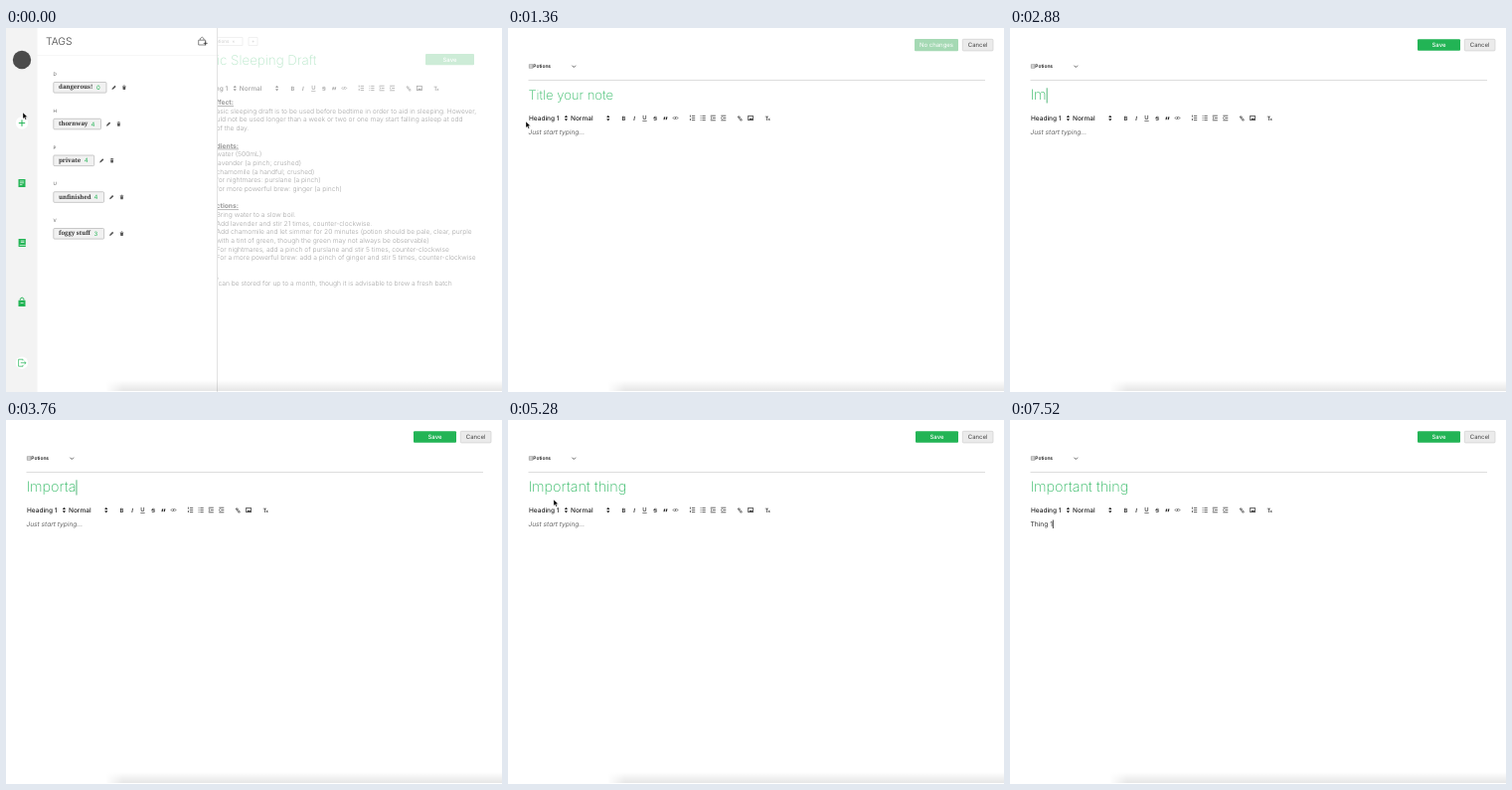
Write an HTML page that moves like this. It is 499 px wide and 366 px high and loops after 8 s.

```html
<!DOCTYPE html>
<html lang="en">
<head>
<meta charset="utf-8">
<title>Note editor</title>
<style>
html, body { margin: 0; width: 100%; height: 100%; overflow: hidden; background: #fff; }
svg { display: block; width: 499px; height: 366px; font-family: Inter, "Open Sans", sans-serif; fill: #222; }
text { white-space: pre; text-rendering: geometricPrecision; }
.mid { text-anchor: middle; }
.light { font-weight: 300; }
.title { font-weight: 200; fill: #2fb862; }
.line { fill: none; stroke: #222; stroke-width: .7; }
.green { fill: none; stroke: #22b455; stroke-width: 1; }
.tag { font: 600 6px "Noto Serif", serif; fill: #333; }
.copy { font-size: 6.71px; font-weight: 300; fill: #a6a6a6; }
.head { font-weight: 700; text-decoration: underline; fill: #999; }
.list { font-size: 5.7px; font-weight: 700; fill: #111; }
</style>
</head>
<body>
<svg viewBox="0 0 499 366">
  <defs>
    <linearGradient id="shade" x2="0" y2="1">
      <stop offset="0" stop-opacity="0"/><stop offset="1" stop-opacity=".1"/>
    </linearGradient>
    <linearGradient id="edge">
      <stop offset="0" stop-color="#fff"/><stop offset="1" stop-color="#fff" stop-opacity="0"/>
    </linearGradient>
    <g id="bar">
      <g font-size="6.5" font-weight="500">
        <text x="21" y="92.7">Heading 1</text><text x="63" y="92.7">Normal</text>
      </g>
      <path d="M56.8 90l1.6-2.2 1.6 2.2zm0 1.2h3.2l-1.6 2.2zM99.2 90l1.6-2.2 1.6 2.2zm0 1.2h3.2l-1.6 2.2z"/>
      <g class="mid" font-size="5.8" font-weight="600">
        <text x="116.5" y="92.5">B</text>
        <text x="127" y="92.5" font-style="italic">I</text>
        <text x="137.5" y="92.2" font-weight="500" text-decoration="underline">U</text>
        <text x="148" y="92.5" font-weight="500" text-decoration="line-through">S</text>
        <text x="158.3" y="96" font-size="9" font-weight="800">”</text>
        <text x="260.3" y="92.5" font-weight="500">T</text>
        <text x="262.7" y="93.3" font-size="4">x</text>
      </g>
      <path class="line" d="M167.4 89.2l-1.3 1.3 1.3 1.3m2.2-2.6l1.3 1.3-1.3 1.3m-1.5.1l.8-2.8"/>
      <path class="line" d="M184.9 88.4h3.3m-3.3 2.1h3.3m-3.3 2.1h3.3M183.4 87.6v2m0 1.4v2
        M195.4 88.4h3.3m-3.3 2.1h3.3m-3.3 2.1h3.3M193.6 88.4h.9m-.9 2.1h.9m-.9 2.1h.9
        M203.8 88.2h5m-3 2.3h3m-5 2.3h5m-5-3.4l1.3 1.1-1.3 1.1
        M214.3 88.2h5m-3 2.3h3m-5 2.3h5m-3.8-3.4l-1.2 1.1 1.2 1.1"/>
      <path class="line" d="M233.6 89.8l-.9-.9q-.9-.6-1.3.2t.6 1.3l.9.6m1.2-.1l1 .9q.5 1-.4 1.2t-1.3-.5l-.7-.9m-.6-1.9l2.2 2"/>
      <rect class="line" x="241.7" y="88.3" width="4.8" height="4.4"/>
      <path d="M242.4 92.3l1.3-1.8 1 .9.7-.6.8 1.5z"/>
    </g>
  </defs>

  <g id="editor">
    <g id="idle">
      <rect x="409" y="11" width="44" height="12.3" rx="1" fill="#a5d9b4"/>
      <text class="mid" x="431" y="19.2" font-size="6" fill="#fff">No changes</text>
    </g>
    <g id="save">
      <rect x="410" y="11.3" width="43" height="11.5" rx="1" fill="#22b455"/>
      <text class="mid" x="431.5" y="19.2" font-size="6" font-weight="500" fill="#fff">Save</text>
    </g>
    <rect x="457.3" y="11.3" width="30.7" height="11.6" rx="1" fill="#ebebeb" stroke="#cfcfcf" stroke-width=".7"/>
    <text class="mid" x="472.6" y="19.2" font-size="6" fill="#444">Cancel</text>
    <path class="line" d="M21.3 36.6h3.6v3.8h-3.6zm0 1.3h3.6m-3.6 1.2h3.6" style="stroke:#777;stroke-width:.5"/>
    <text x="25.3" y="40.3" font-size="4.9" font-weight="600">Potions</text>
    <path class="line" d="M64.4 37.7l1.8 1.8 1.8-1.8"/>
    <path d="M20.5 52.5h459.5" stroke="#ddd"/>
    <text id="hint" class="title" x="20.4" y="72.4" font-size="13.1">Title your note</text>
    <text id="title" class="title" x="20.4" y="72.4" font-size="14.4"></text>
    <use href="#bar"/>
    <text id="bodyHint" x="20.4" y="107.3" font-size="6.6" font-style="italic" fill="#666">Just start typing...</text>
    <text id="body" x="20.4" y="107.3" font-size="6.7" fill="#333"></text>
    <g id="list">
      <rect x="-2" y="75.5" width="503" height="63" fill="#fff" stroke="#a3cdef"/>
    </g>
    <rect id="caret" width=".9"/>
  </g>

  <g id="tags">
    <rect width="499" height="366" fill="#fff"/>
    <g id="note">
      <path d="M205 9.5h33v8h-33zM244 9.5h9v8h-9z" fill="none" stroke="#eee" stroke-width=".8"/>
      <text x="211" y="15.3" font-size="4.7" fill="#ccc">otions  ×</text>
      <text x="247" y="15.3" font-size="5" fill="#ccc">+</text>
      <text class="title" x="212" y="36.7" font-size="13.4" opacity=".35">ic Sleeping Draft</text>
      <rect x="422" y="26" width="49" height="11.3" rx="1" fill="#cdecd7"/>
      <text class="mid" x="446.5" y="33.8" font-size="6" font-weight="500" fill="#fff">Save</text>
      <use href="#bar" x="171.8" y="-30" opacity=".42"/>
    </g>
    <rect x="31" width="181" height="366" fill="#fff"/>
    <path d="M31 27.5h181" stroke="#f7f7f7"/>
    <path d="M212.5 0v366" stroke="#e2e2e2"/>
    <rect width="31.5" height="366" fill="#f3f3f3"/>
    <text class="light" x="40" y="17" font-size="10.3" fill="#444">TAGS</text>
    <path class="line" d="M193.7 12.2h7v4.8h-7zm1.6-.2v-1.3q2-3 3.8 0v1.3" style="stroke:#555"/>
    <path class="line" d="M200.7 13.4v4m-2-2h4" style="stroke:#333"/>
    <circle cx="16" cy="32" r="9.2" fill="#4b4b4b"/>
    <g fill="#fff"><circle cx="16" cy="95.5" r="6.2"/><circle cx="16" cy="336.7" r="6.2"/></g>
    <path class="green" d="M16 92.4v6.4m-3.2-3.2h6.4"/>
    <path d="M12.5 152h7v8h-7zM12.6 212h7.2v8h-7.2zM12.5 273.7h7v6.3h-7z" fill="#22b455"/>
    <path class="green" d="M14.3 273.5v-1.3q1.8-2.4 3.6 0v1.3"/>
    <path d="M13.9 154h4.2m-4.2 1.8h4.2m-4.2 1.8h2.5M14.8 214h3.6m-3.6 1.5h3.6M13.6 218.4h6.2M14.6 276.5h3" stroke="#fff" stroke-width=".7"/>
    <path class="green" d="M17 334.4v-1.2h-4.4v7h4.4v-1.2M14.8 336.7h5.2m-1.6-1.6l1.6 1.6-1.6 1.6" style="stroke-width:.7"/>
  </g>

  <rect x="101" y="354" width="398" height="11" fill="url(#shade)"/>
  <rect x="100" y="353" width="18" height="13" fill="url(#edge)"/>

  <path id="arrow" d="M0 0v6.3l1.5-1.3 1 2.3 1.1-.5-1-2.2h2z" fill="#000" stroke="#fff" stroke-width=".4"/>
  <path id="beam" d="M-1.6-4.3q1.6 0 1.6 1 0-1 1.6-1M0-3.4v6.8M-1.6 4.3q1.6 0 1.6-1 0 1 1.6 1" class="line"/>
</svg>
<script>
const $ = id => document.getElementById(id);
const add = (id, markup) => $(id).insertAdjacentHTML('beforeend', markup);

["SUPER", "d", "k", "a", "kjanksdfs", "afskjdnfasd"].forEach((s, i) =>
  add('list', `<text class="list" x="3.4" y="${83.5 + i * 10.4}">${s}</text>`));

// letter, label, count, right edge of the pill
[["D", "dangerous!", 0, 101], ["H", "thornway", 4, 95.5], ["P", "private", 4, 88.7],
 ["U", "unfinished", 4, 98.6], ["V", "foggy stuff", 3, 98.6]].forEach(([letter, label, n, r], i) => {
  const y = 59.8 + i * 36.75;
  add('tags', `<text x="47.6" y="${y - 11.8}" font-size="4.6" fill="#555">${letter}</text>
    <rect x="47.8" y="${y - 5.3}" width="${r - 47.8}" height="10.6" rx="1" fill="#f1f1f1" stroke="#bdbdbd" stroke-width=".8"/>
    <text class="tag" x="53" y="${y + 1.6}">${label}</text>
    <text x="${r - 10}" y="${y + 2}" font-size="6" fill="#22b455">${n}</text>
    <g transform="translate(${r + 7.5} ${y})" fill="#555">
      <path d="M-2 2.2l.4-1.6 2.6-2.7 1.2 1.2-2.7 2.7z"/>
      <path d="M8.6-1.8h3.6v.6h-3.6zM9.7-2.4h1.4v.6h-1.4zM8.9-.9h3l-.3 3.1h-2.4z"/>
    </g>`);
});

// first baseline, then lines; a leading # marks a heading
[[77.1, "#ffect:", "asic sleeping draft is to be used before bedtime in order to aid in sleeping. However,",
  "uld not be used longer than a week or two or one may start falling asleep at odd", "of the day."],
 [120.6, "#dients:", "water (500mL)", "lavender (a pinch; crushed)", "chamomile (a handful; crushed)",
  "for nightmares: purslane (a pinch)", "for more powerful brew: ginger (a pinch)"],
 [181.4, "#ctions:", "Bring water to a slow boil.", "Add lavender and stir 21 times, counter-clockwise.",
  "Add chamomile and let simmer for 20 minutes (potion should be pale, clear, purple",
  "with a tint of green, though the green may not always be observable)",
  "For nightmares, add a pinch of purslane and stir 5 times, counter-clockwise",
  "For a more powerful brew: add a pinch of ginger and stir 5 times, counter-clockwise"],
 [250.6, "#:", " can be stored for up to a month, though it is advisable to brew a fresh batch", "."]
].forEach(([y, ...lines]) => lines.forEach((s, i) =>
  add('note', `<text class="copy ${s[0] == '#' ? 'head' : ''}" x="211.5" y="${y + i * 8.65}">${s.replace('#', '')}</text>`)));

const titleKeys = [2620, 2860, 3040, 3220, 3420, 3600, 3760, 3920, 4060, 4380, 4420, 4480, 4540, 4580, 4660];
const bodyKeys = [6580, 6820, 6940, 7060, 7200, 7360, 7520];
const typed = (s, keys, t) => s.slice(0, keys.filter(k => k <= t).length);
const within = (t, a, b) => t >= a && t < b;
const show = (id, on) => $(id).style.display = on ? '' : 'none';
const ramp = (t, a, b) => {
  const p = Math.min(1, Math.max(0, (t - a) / (b - a)));
  return p * p * (3 - 2 * p);
};
const mix = (a, b, p) => a + (b - a) * p;

function pointer(t) {
  if (t < 1560) return [mix(17, 18, ramp(t, 20, 460)), mix(85, 94, ramp(t, 20, 460))];
  if (t < 5000) return [mix(18, 46.5, ramp(t, 1560, 1960)), mix(94, 70.5, ramp(t, 1560, 1960))];
  return [mix(46.5, 44, ramp(t, 5200, 5460)), mix(70.5, 111.3, ramp(t, 5200, 5460))];
}

function draw(t) {
  const fade = 1 - Math.min(1, Math.max(0, (t - 760) / 240));
  $('tags').style.opacity = fade;
  show('tags', fade > 0);

  const title = typed("Important thing", titleKeys, t);
  const body = typed("Thing 1", bodyKeys, t);
  $('title').textContent = title;
  $('body').textContent = body;
  show('hint', !title);
  show('bodyHint', !body);
  show('idle', !title);
  show('save', title);
  show('list', within(t, 2100, 2600));

  const inBody = t >= 5460;
  const x = inBody ? 20.3 + (body && $('body').getComputedTextLength())
                   : 20.1 + (title && $('title').getComputedTextLength() + .4);
  const caret = $('caret');
  caret.setAttribute('x', x);
  caret.setAttribute('y', inBody ? 100.5 : 60.3);
  caret.setAttribute('height', inBody ? 8.5 : 15.2);
  caret.setAttribute('fill', inBody ? '#333' : '#3fae6a');
  show('caret', within(t, 1960, 5200) || within(t, 5680, 6200) || t >= 6580);

  const [px, py] = pointer(t);
  const overText = t > 1560 && (py < 78 || py > 99);
  const visible = t < 2600 || within(t, 5200, 6540);
  for (const id of ['arrow', 'beam']) {
    $(id).setAttribute('transform', `translate(${px} ${py})`);
    show(id, visible && overText == (id == 'beam'));
  }
}

const start = performance.now();
function tick() {
  draw((performance.now() - start) % 8000);
  requestAnimationFrame(tick);
}
tick();
</script>
</body>
</html>
```
